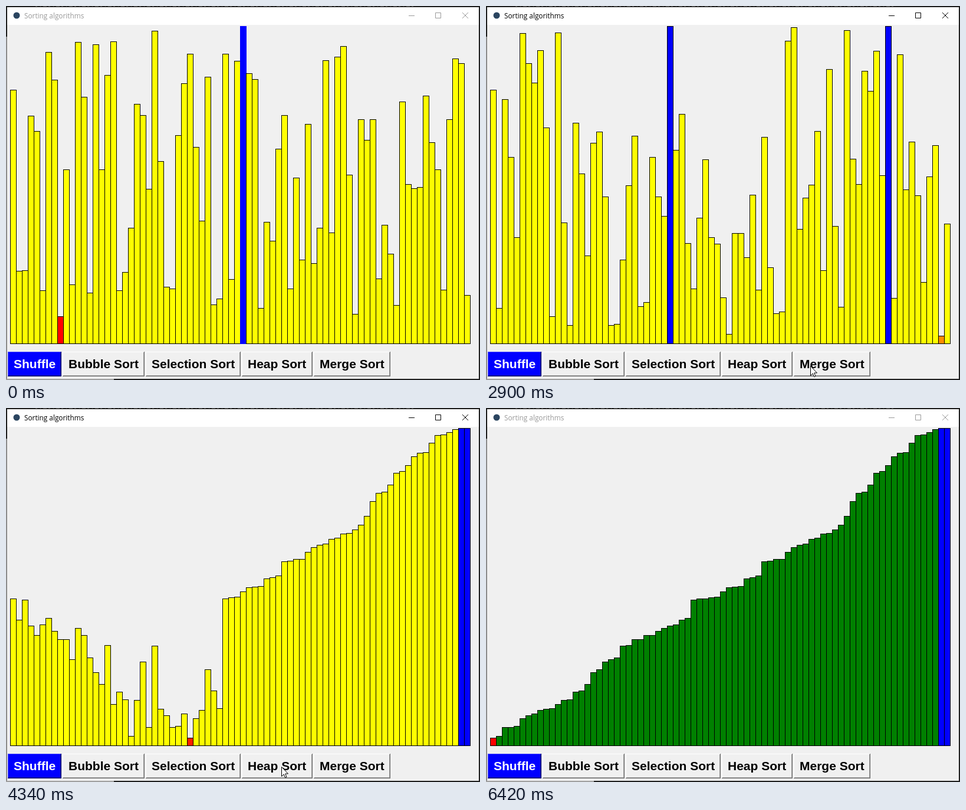
An HTML page that plays this animation: 804 by 634 pixels, repeating every 6610 ms.

```html
<!DOCTYPE html>
<html lang="en">
<head>
<meta charset="utf-8">
<title>Sorting algorithms</title>
<style>
html, body { margin: 0; width: 100%; height: 100%; overflow: hidden; background: #f0f0f0; }
svg { display: block; width: 804px; height: 634px; }
.title { font: 11.8px "Open Sans", "Noto Sans", sans-serif; }
.label { font: bold 21px "Liberation Sans", Arial, sans-serif; }
</style>
</head>
<body>
<svg id="stage" viewBox="0 0 804 634" xmlns="http://www.w3.org/2000/svg"></svg>
<script>
const LOOP = 6610, BASE = 572;
const SVG_NS = "http://www.w3.org/2000/svg";
const stage = document.getElementById("stage");

// Top edge of each bar before and after the shuffle
const before = [
  142, 449, 448, 186, 212, 482, 78, 125, 526, 277, 472, 61, 154, 486, 65, 277, 117, 60, 482, 451,
  376, 166, 185, 310, 42, 263, 476, 479, 219, 131, 81, 239, 364, 120, 506, 496, 81, 463, 93, 34,
  114, 124, 512, 366, 398, 242, 185, 479, 291, 430, 200, 436, 376, 92, 384, 86, 68, 286, 522, 192,
  227, 192, 462, 371, 420, 507, 162, 302, 309, 307, 152, 231, 277, 481, 192, 89, 97, 490
];
const shuffled = [
  142, 512, 158, 256, 392, 46, 97, 130, 75, 206, 526, 45, 367, 541, 198, 284, 423, 232, 213, 323,
  541, 539, 430, 304, 220, 509, 502, 256, 323, 356, 34, 244, 183, 402, 479, 359, 260, 392, 403, 494,
  556, 385, 385, 426, 320, 481, 222, 443, 521, 518, 59, 36, 378, 325, 303, 212, 448, 107, 373, 510,
  41, 259, 302, 110, 144, 76, 287, 34, 495, 82, 311, 230, 321, 468, 289, 236, 559, 369
];

function el(name, attrs, parent = stage) {
  const node = document.createElementNS(SVG_NS, name);
  for (const key in attrs) node.setAttribute(key, attrs[key]);
  parent.appendChild(node);
  return node;
}

function box(x, y, width, height, fill, parent) {
  return el("rect", { x, y, width, height, fill }, parent);
}

function text(x, y, str, cls, fill, parent) {
  const node = el("text", { x, y, class: cls, fill }, parent);
  node.textContent = str;
  return node;
}

// Heap sort; a smaller top edge means a taller bar
function siftDown(a, i, n) {
  for (;;) {
    const left = 2 * i + 1, right = left + 1;
    let big = i;
    if (left < n && a[left] < a[big]) big = left;
    if (right < n && a[right] < a[big]) big = right;
    if (big === i) return;
    [a[i], a[big]] = [a[big], a[i]];
    i = big;
  }
}

function heapSteps(list) {
  const a = list.slice();
  for (let i = (a.length >> 1) - 1; i >= 0; i--) siftDown(a, i, a.length);
  const steps = [a.slice()];
  for (let end = a.length - 1; end > 0; end--) {
    [a[0], a[end]] = [a[end], a[0]];
    siftDown(a, 0, end);
    steps.push(a.slice());
  }
  return steps;
}
const steps = heapSteps(shuffled);

// Window
box(0, 0, 804, 634, "#1f1f1f");
el("path", { d: "M50 .5H695", stroke: "#666", "stroke-dasharray": "3 5 1 4 6 3" });
box(0, 52, 2, 582, "#8c8c8c");
box(0, 632, 183, 2, "#a0a0a0");
box(2, 2, 800, 630, "#f0f0f0");
box(2, 2, 800, 30, "#fff");
el("circle", { cx: 18, cy: 16, r: 5.5, fill: "#2b4560" });
const title = text(31, 21, "Sorting algorithms", "title", "#000");
const controls = el("path", {
  d: "M683 16.5H693M728.5 11.5H737.5V20.5H728.5ZM774 11L784 21M784 11L774 21", fill: "none"
});

// Bars
const chart = el("g", { "shape-rendering": "crispEdges" });
const bars = before.map((_, i) => el("rect", { x: 7.5 + 10 * i, width: 10, stroke: "#000" }, chart));

function drawBars(tops, fill, lowFill, highLine) {
  const high = Math.min(...tops), low = Math.max(...tops);
  bars.forEach((bar, i) => {
    const top = tops[i], isHigh = top === high;
    bar.setAttribute("y", top + 0.5);
    bar.setAttribute("height", BASE - top);
    bar.setAttribute("fill", isHigh ? "#00f" : top === low ? lowFill : fill);
    bar.setAttribute("stroke", isHigh ? highLine : "#000");
  });
}

// Buttons
function button(x, right, str, blue) {
  const w = right - x, y = 586, h = 42;
  const light = blue ? "#4a4aff" : "#fff", dark = blue ? "#00006e" : "#696969";
  const mid = blue ? "#00009a" : "#a0a0a0", face = blue ? "#00f" : "#f0f0f0";
  const g = el("g", {});
  const rim = box(x, y, w, h, dark, g);
  const lit = box(x, y, w - 1, h - 1, light, g);
  const shade = box(x + 1, y + 1, w - 2, h - 2, mid, g);
  box(x + 1, y + 1, w - 3, h - 3, face, g);
  const label = text(x + 10, 614, str, "label", blue ? "#fff" : "#000", g);
  return pressed => {
    rim.setAttribute("fill", pressed ? light : dark);
    lit.setAttribute("fill", pressed ? dark : light);
    shade.setAttribute("fill", pressed ? face : mid);
    label.setAttribute("transform", pressed ? "translate(1 1)" : "");
  };
}
const pressShuffle = button(3, 94, "Shuffle", true);
button(96, 235, "Bubble Sort");
button(237, 398, "Selection Sort");
const pressHeap = button(400, 520, "Heap Sort");
button(522, 652, "Merge Sort");

// Pointer
const pointer = el("path", {
  d: "M.5 .5V16.5L4.2 13L6.6 18.6L9 17.6L6.7 12H11.5Z", fill: "#fff", stroke: "#000"
});
const track = [
  [460, 184, 624], [600, 130, 620], [740, 82, 613], [880, 63, 607],
  [1890, 76, 604], [2036, 210, 596], [2182, 380, 595], [2328, 520, 602], [2401, 568, 609], [2547, 550, 609],
  [2760, 547, 611], [2900, 550, 610], [3040, 530, 612], [3250, 481, 610],
  [3320, 472, 608], [3390, 467, 608]
];
// Start, end and tick of each pointer move
const moves = [[460, 880, 70], [1890, 2547, 73], [2620, 3250, 70], [3320, 3390, 70], [5420, 5420, 70]];

function pointerAt(t) {
  if (t < 460 || t >= 5490) return null;
  const [start, end, tick] = moves.filter(m => m[0] <= t).pop();
  const q = Math.min(end, start + Math.floor((t - start) / tick) * tick);
  if (q === 5420) return [481, 621];
  const n = track.findIndex(p => p[0] >= q);
  if (n <= 0) return track[0].slice(1);
  const a = track[n - 1], b = track[n], u = (q - a[0]) / (b[0] - a[0]);
  return [1, 2].map(k => Math.round(a[k] + (b[k] - a[k]) * u));
}

function sortCount(t) {
  const q = t < 3930 ? 3860 : t < 3990 ? 3930 : 3990 + Math.floor((t - 3990) / 70) * 70;
  const k = q < 4130 ? 5 + (q - 3930) * 0.085 : 22 + (q - 4130) * 52 / 560;
  return Math.max(0, Math.min(steps.length - 1, Math.round(k)));
}

function render(t) {
  const active = t >= 1160 && t < 6420;
  title.setAttribute("fill", active ? "#000" : "#999");
  controls.setAttribute("stroke", active ? "#000" : "#999");

  if (t < 1360) drawBars(before, "#ff0", "#f00", "#00f");
  else if (t < 3860) drawBars(shuffled, "#ff0", "#ff8c00", "#000");
  else if (t < 4760) drawBars(steps[sortCount(t)], "#ff0", t < 4690 ? "#ff2000" : "#000", "#000");
  else drawBars(steps[steps.length - 1], "#008000", "#f00", "#000");

  pressShuffle(t >= 1160 && t < 1430);
  pressHeap(t >= 3660 && t < 3860);

  const at = pointerAt(t);
  pointer.setAttribute("visibility", at ? "visible" : "hidden");
  if (at) pointer.setAttribute("transform", `translate(${at})`);
}

const startTime = performance.now();
function tick() {
  render((performance.now() - startTime) % LOOP);
  requestAnimationFrame(tick);
}
render(0);
requestAnimationFrame(tick);
</script>
</body>
</html>
```
